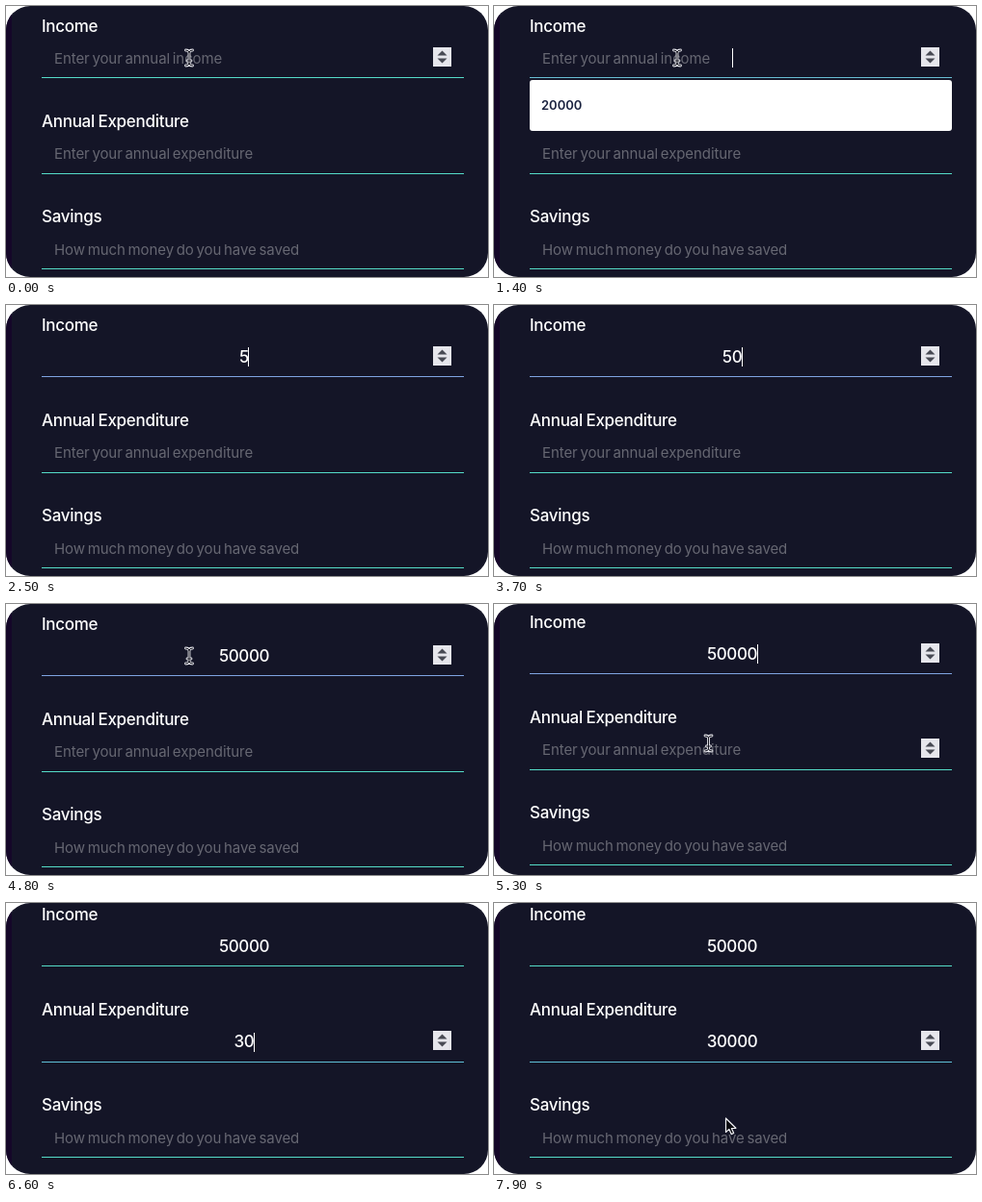
Write an HTML page with a canvas that moves like this. It is 500 px wide and 282 px high and loops after 8000 ms.

```html
<!DOCTYPE html>
<html lang="en">
<head>
<meta charset="utf-8">
<title>Budget form</title>
<style>
html, body { margin: 0; width: 100%; height: 100%; overflow: hidden; background: #fff; }
canvas { display: block; width: 500px; height: 282px; }
</style>
</head>
<body>
<canvas id="stage" width="500" height="282"></canvas>
<script>
const ctx = document.getElementById('stage').getContext('2d');
const LOOP = 8000, STEP = 100;
const FONT = 'Inter, Roboto, sans-serif';
const TEAL = '#55dcc8';
const MID = 247;

// Type styles: size, weight, colour, letter and word spacing
const LABEL = { size: 17, weight: 500, color: '#fff', letter: -0.29, word: -0.7 };
const HINT = { size: 15, weight: 400, color: '#666772', letter: -0.08, word: -1.39 };
const VALUE = { size: 17, weight: 500, color: '#fff', letter: -0.4, word: 0 };
const OPTION = { size: 13, weight: 600, color: '#1b2340', letter: 0, word: 0 };

const fields = [
  { label: 'Income', hint: 'Enter your annual income', dy: 0,
    keys: [[2500, '5'], [2700, '50'], [3900, '500'], [4000, '5000'], [4300, '50000']],
    focus: 1400, blur: 5400, glow: '#7fa4e2' },
  { label: 'Annual Expenditure', hint: 'Enter your annual expenditure', dy: 99.4,
    keys: [[6100, '3'], [6500, '30'], [6900, '300'], [7000, '3000'], [7300, '30000']],
    focus: 5400, blur: LOOP, glow: '#5fc0d8' },
  { label: 'Savings', hint: 'How much money do you have saved', dy: 198.8,
    keys: [], focus: Infinity, blur: Infinity, glow: TEAL }
];

const ease = (t, a, b) => {
  const u = Math.min(1, Math.max(0, (t - a) / (b - a)));
  return u * u * (3 - 2 * u);
};
const mix = (a, b, u) => a + (b - a) * u;

function setType(s) {
  ctx.font = `${s.weight} ${s.size}px ${FONT}`;
  ctx.letterSpacing = s.letter + 'px';
  ctx.wordSpacing = s.word + 'px';
  ctx.fillStyle = s.color;
}

function text(str, x, y, style) {
  setType(style);
  ctx.fillText(str, x, y);
}

function poly(points) {
  ctx.beginPath();
  points.forEach(([x, y]) => ctx.lineTo(x, y));
  ctx.closePath();
}

function stepper(y) {
  ctx.fillStyle = '#e6e6ec';
  ctx.fillRect(443, y, 19, 20);
  ctx.fillStyle = '#484a54';
  poly([[447.5, y + 8.5], [452.5, y + 3.5], [457.5, y + 8.5]]);
  ctx.fill();
  poly([[447.5, y + 11.5], [452.5, y + 16.5], [457.5, y + 11.5]]);
  ctx.fill();
}

function field(f, t, scroll, mouse) {
  const at = y => Math.round(y + f.dy) - scroll;
  const active = t >= f.focus && t < f.blur;
  const over = mouse && mouse.y > at(35) && mouse.y < at(74);
  const typed = f.keys.filter(k => t >= k[0]).pop();

  text(f.label, 37, at(26.6), LABEL);

  let end = MID;
  if (typed) {
    setType(VALUE);
    const half = ctx.measureText(typed[1]).width / 2;
    ctx.fillText(typed[1], MID - half, at(59.8));
    end = MID + half;
  } else {
    text(f.hint, 50, at(59.8), HINT);
  }

  // The caret blinks every half second, restarted by each key.
  if (active) {
    const since = t - (typed ? typed[0] : f.focus);
    if (since % 1000 < 500) {
      ctx.fillStyle = '#fff';
      ctx.fillRect(Math.floor(end), at(44.3), 1, 20);
    }
  }
  if (active || over) stepper(at(43));

  ctx.fillStyle = TEAL;
  ctx.fillRect(37, at(74.3), 438, 1);
  if (active) {
    ctx.globalAlpha = t === f.focus ? 0.5 : 1;
    ctx.fillStyle = f.glow;
    ctx.fillRect(37, at(74.3), 438, 1);
    ctx.globalAlpha = 1;
  }
}

function suggestion() {
  ctx.fillStyle = '#fff';
  ctx.beginPath();
  ctx.roundRect(37, 77, 438, 53, 3);
  ctx.fill();
  text('20000', 49, 108, OPTION);
}

function mouseAt(t) {
  if (t < 2500) return { x: 190, y: 54 };
  if (t >= 4800 && t < 6100) {
    const u = ease(t, 4800, 5300);
    return { x: mix(190, 222.5, u), y: mix(54, 145, u) };
  }
  if (t >= 7800) {
    const u = ease(t, 7700, 7900);
    return { x: mix(222.5, 240.5, u), y: mix(145, 224, u) };
  }
  return null;
}

function beam(x, y) {
  ctx.beginPath();
  for (const s of [-1, 1]) {
    ctx.moveTo(x - 3.5, y + s * 8);
    ctx.quadraticCurveTo(x, y + s * 8, x, y + s * 5.5);
    ctx.quadraticCurveTo(x, y + s * 8, x + 3.5, y + s * 8);
  }
  ctx.moveTo(x, y - 6);
  ctx.lineTo(x, y + 6);
  ctx.moveTo(x - 2, y + 3);
  ctx.lineTo(x + 2, y + 3);
  ctx.lineCap = 'round';
  ctx.strokeStyle = '#e8e8ee';
  ctx.lineWidth = 2.8;
  ctx.stroke();
  ctx.strokeStyle = '#14151f';
  ctx.lineWidth = 1;
  ctx.stroke();
}

function arrow(x, y) {
  const shape = [[0, 0], [0, 14.5], [3.4, 11.4], [5.7, 16.6], [8.2, 15.5], [5.9, 10.5], [10.4, 10.3]];
  poly(shape.map(([a, b]) => [x + a, y + b]));
  ctx.fillStyle = '#0b0b10';
  ctx.fill();
  ctx.strokeStyle = '#f0f0f4';
  ctx.lineWidth = 1.2;
  ctx.lineJoin = 'round';
  ctx.stroke();
}

function draw(t) {
  const scroll = Math.round(9 * ease(t, 5150, 5600));
  const mouse = mouseAt(t);
  ctx.fillStyle = '#fff';
  ctx.fillRect(0, 0, 500, 282);
  ctx.save();
  ctx.beginPath();
  ctx.roundRect(0, 0, 500, 282, 25);
  ctx.clip();
  ctx.fillStyle = '#141527';
  ctx.fillRect(0, 0, 500, 282);
  ctx.fillStyle = '#150729';
  ctx.fillRect(0, 0, 6, 282);

  fields.forEach(f => field(f, t, scroll, mouse));
  if (t >= 1400 && t < 2500) suggestion();
  if (mouse) {
    const inField = fields.slice(0, 2).some(f => {
      const y = mouse.y + scroll - f.dy;
      return y > 35 && y < 74;
    });
    (inField ? beam : arrow)(mouse.x, mouse.y);
  }
  ctx.restore();
}

function tick() {
  draw(Math.floor((performance.now() % LOOP) / STEP) * STEP);
  requestAnimationFrame(tick);
}
tick();
</script>
</body>
</html>
```
